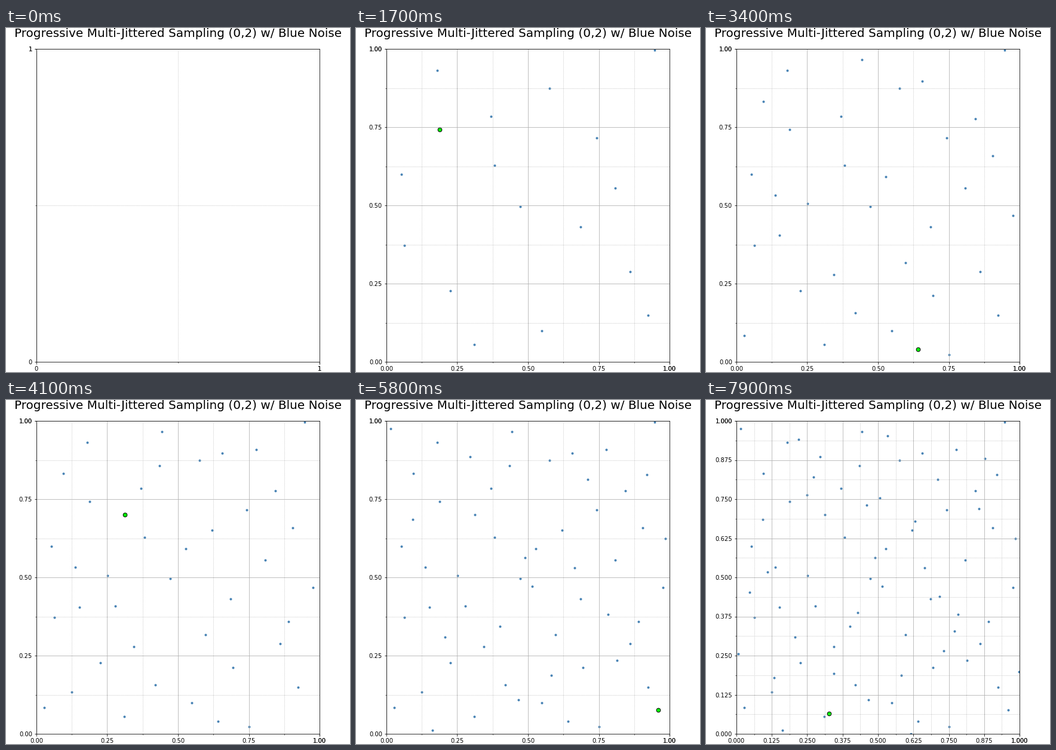
Recreate the animation shown at these times as a matplotlib script. Size 576 by 576 pixels, loop 8 s.

```python
import numpy as np
import matplotlib.pyplot as plt
from matplotlib.animation import FuncAnimation

SIZE, DPI = 576, 72
LEFT, BOTTOM, WIDTH, HEIGHT = 50.9, 17, 474.2, 524
FRAMES, INTERVAL = 80, 100
CANDIDATES = 600

# Stage positions of the first 16 samples; all later ones grow from these.
KEY_POINTS = [(76, 245), (311, 507), (275, 299), (500, 37),
              (226, 148), (459, 408), (158, 440), (403, 184),
              (232, 230), (489, 481), (81, 364), (324, 101),
              (136, 71), (376, 333), (198, 530), (434, 268)]

# Each pass mirrors a parent's stratum: diagonally, sideways, then vertically.
FLIPS = [(1, 1), (1, 0), (0, 1)]


def count_clashes(cands, points, bits):
    """Count the elementary intervals of area 2**-bits already occupied."""
    clashes = np.zeros(len(cands), int)
    for i in range(bits + 1):
        scale = np.array([2 ** i, 2 ** (bits - i)])
        a, b = np.floor(cands * scale), np.floor(points * scale)
        clashes += (a[:, None] == b).all(axis=2).any(axis=1)
    return clashes


def nearest_distance(cands, points):
    gap = np.abs(cands[:, None] - points)
    gap = np.minimum(gap, 1 - gap)
    return np.hypot(gap[..., 0], gap[..., 1]).min(axis=1)


def extend(points, total, rng):
    """Grow a progressive (0,2) set, keeping each new sample far from the rest."""
    base = len(points)
    while len(points) < total:
        n = len(points)
        if n == 4 * base:
            base = n
        step, parent = divmod(n - base, base)
        cells = 2 * int(np.sqrt(base))
        cell = np.floor(points[parent] * cells).astype(int) ^ FLIPS[step]
        cands = (cell + rng.random((CANDIDATES, 2))) / cells
        clashes = count_clashes(cands, points, n.bit_length())
        cands = cands[clashes == clashes.min()]
        best = cands[nearest_distance(cands, points).argmax()]
        points = np.vstack([points, best])
    return points


x, y = np.array(KEY_POINTS, float).T
keys = np.column_stack([(x - LEFT) / WIDTH, (SIZE - BOTTOM - y) / HEIGHT])
samples = extend(keys, FRAMES - 1, np.random.default_rng(2))

fig = plt.figure(figsize=(SIZE / DPI, SIZE / DPI), dpi=DPI, facecolor="white")
ax = fig.add_axes([LEFT / SIZE, BOTTOM / SIZE, WIDTH / SIZE, HEIGHT / SIZE])
fig.text(0.5, 561 / SIZE, "Progressive Multi-Jittered Sampling (0,2) w/ Blue Noise",
         fontsize=20, ha="center", va="baseline")


def draw_grid(count):
    level = 0
    while 4 ** (level + 1) <= count:
        level += 1
    cells = 2 ** level
    # The closing tick is set twice, which darkens its label.
    major = np.append(np.arange(cells + 1) / cells, 1)
    minor = (np.arange(cells) + 0.5) / cells
    labels = [f"{t:.{level}f}" for t in major]
    for set_ticks in (ax.set_xticks, ax.set_yticks):
        set_ticks(major, labels=labels)
        set_ticks(minor, minor=True)
    ax.grid(which="major", color="#b0b0b0", lw=0.8)
    ax.grid(which="minor", color="#b0b0b0", lw=0.8, ls=":")


def draw(count):
    ax.clear()
    draw_grid(count)
    if count:
        ax.scatter(*samples[:count].T, s=9, color="steelblue")
        ax.scatter(*samples[count - 1], s=45, color="lime", edgecolors="black", lw=1)
    ax.set(xlim=(0, 1), ylim=(0, 1))
    return ax.collections


anim = FuncAnimation(fig, draw, frames=FRAMES, init_func=lambda: draw(0),
                     interval=INTERVAL, repeat=True, repeat_delay=0)
plt.show()
```
